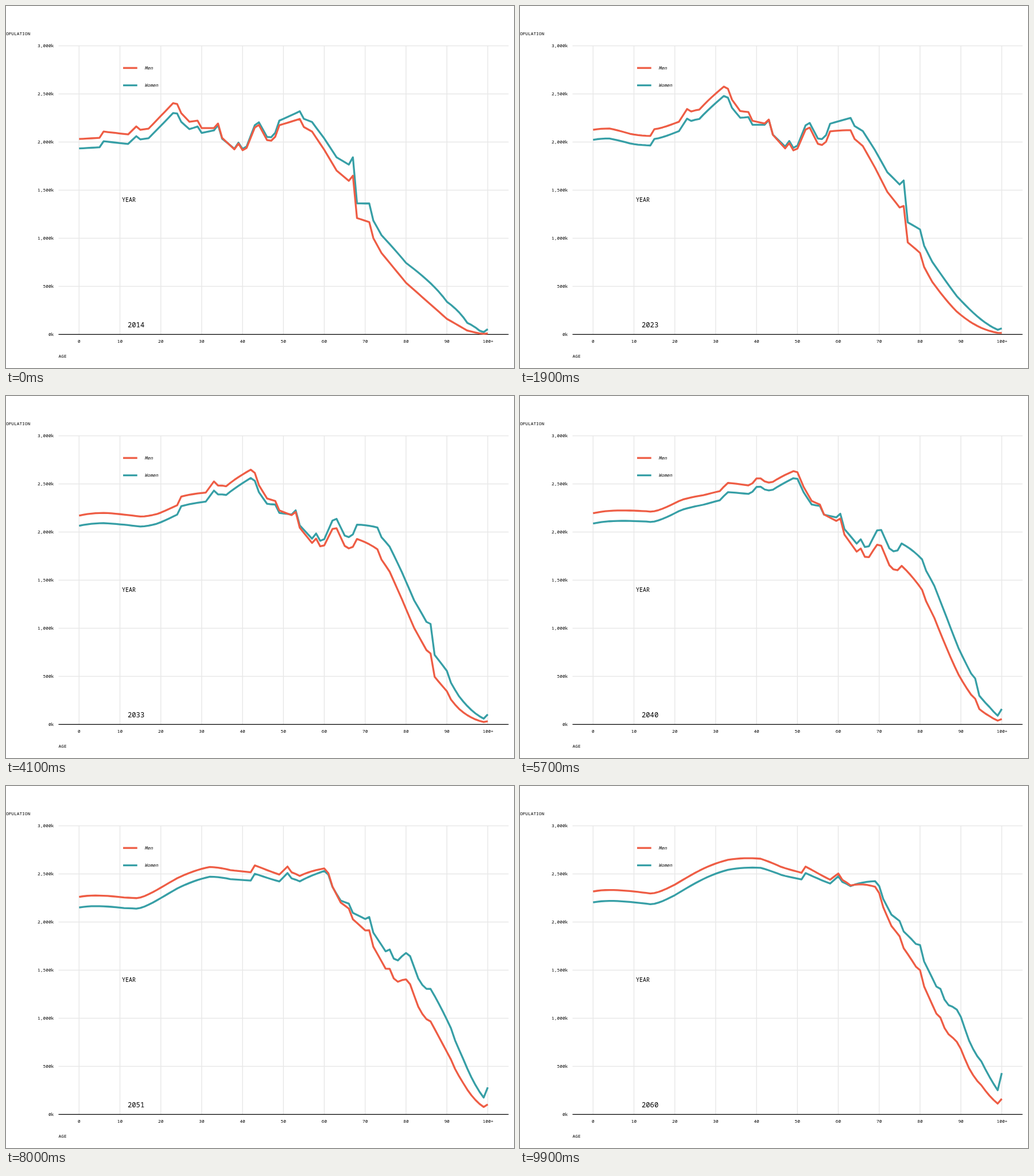
An HTML page that plays this animation: 885x632 px, repeating every 10000 ms.

```html
<!DOCTYPE html>
<html lang="en">
<head>
<meta charset="utf-8">
<title>Population by age</title>
<style>
  html, body { margin: 0; width: 100%; height: 100%; overflow: hidden; background: #fff; }
  svg { display: block; width: 885px; height: 632px; }
  text { font: 500 7.83px "Roboto Mono", "Noto Sans Mono", "DejaVu Sans Mono", monospace; }
  .grid { stroke: #e8e8e8; stroke-width: 1.5; }
  .curve { fill: none; stroke-width: 3.3; stroke-linejoin: round; }
</style>
</head>
<body>
<svg id="chart" viewBox="0 0 885 632"></svg>
<script>
const chart = document.getElementById("chart");
const ZERO = 573.2, STEPS = 100, YEARS = 46;
const { exp, max, round } = Math;
const px = age => 127.3 + 7.12 * age;

function add(tag, attrs, text = "") {
  const el = document.createElementNS("http://www.w3.org/2000/svg", tag);
  for (const key in attrs) el.setAttribute(key, attrs[key]);
  el.textContent = text;
  return chart.appendChild(el);
}
const line = (x1, y1, x2, y2, attrs) => add("line", { x1, y1, x2, y2, ...attrs });
const label = (x, y, text, attrs) => add("text", { x, y, ...attrs }, text);

function interp(points, x) {
  let i = 0;
  while (i < points.length - 2 && x > points[i + 1][0]) i++;
  const [[x0, y0], [x1, y1]] = points.slice(i, i + 2);
  return y0 + (y1 - y0) * (x - x0) / (x1 - x0);
}
const sigmoid = x => 1 / (1 + exp(-x));

// Male cohorts by age in the first year (negative: born later), heights in pixels.
const cohorts = [
  [-46, 389], [-26, 368], [-13, 361], [-5, 353], [0, 341], [5, 343], [6, 354], [12, 349],
  [14, 363], [15, 357], [17, 359], [23, 403.5], [24, 402], [25, 386], [27, 371], [29, 373],
  [30, 360], [33, 360], [34, 368], [35, 343], [38, 323], [39, 333], [40, 321.5], [41, 325.5],
  [43, 361], [44, 365.5], [46, 339], [47, 338], [48, 345], [49, 365], [54, 376], [55, 362],
  [57, 354], [60, 322], [63, 286], [66, 268], [67, 277], [68, 203], [71, 196], [72, 168],
  [74, 142], [80, 90], [90, 27], [95, 6.5], [98, 1.5], [100, 0.1]
];

// Log share of women to men, rising with age.
const womenShare = c => -0.05 + 0.046 * sigmoid((c - 30.5) / 3) + 0.69 * exp(0.082 * (c - 89));

const men = {
  name: "Men", color: "#ee5d45", y: 108.2,
  start: c => interp(cohorts, c),
  migration: 0.195, mortality: 0.199, aging: 0.104, progress: 0.0075,
  oldest: k => 1.6 + 25.5 * (k / YEARS) ** 2.2
};
const women = {
  name: "Women", color: "#379fa6", y: 138.5,
  start: c => interp(cohorts, c) * exp(womenShare(c)),
  migration: 0.205, mortality: 0.119, aging: 0.115, progress: 0.01,
  oldest: k => 9 + 63 * (k / YEARS) ** 2.3
};

// Each cohort gains by migration and shrinks by Gompertz mortality that eases over time.
function height(sex, age, k) {
  if (age === 100) return sex.oldest(k);
  const c = age - k;
  const share = sex.migration + 0.03 * sigmoid((8 - c) / 2.5);
  const gain = a => 0.032 * (1 - exp(-a / 5)) + share * (1 - exp(-((max(0, a - 14) / 14) ** 1.5)));
  const loss = (a, t) => sex.mortality * exp(sex.aging * (a - 69.5) - sex.progress * t);
  const logSize = (a, t) => gain(a) - loss(a, t);
  return sex.start(c) * exp(logSize(age, k) - logSize(max(c, 0), max(-c, 0)));
}

// Static parts
for (let i = 0; i <= 10; i++) {
  line(px(i * 10), 69, px(i * 10), ZERO, { class: "grid" });
  label(px(i * 10) + (i === 10 ? 0.6 : 0), 588, i === 10 ? "100+" : i * 10, { "text-anchor": "middle" });
}
for (let i = 0; i <= 6; i++) {
  const y = 573.4 - i * 84;
  if (i) line(91.5, y, 875.5, y, { class: "grid" });
  label(83.3, y + 2.7, (i * 500).toLocaleString("en-US") + "k", { "text-anchor": "end" });
}
label(42.2, 51.3, "POPULATION", { "text-anchor": "end" });
label(91.5, 614.2, "AGE");
label(202, 341.9, "YEAR", { style: "font-size:10px" });
const yearText = label(212, 561.2, "", { style: "font-size:12.2px" });
line(91.5, 573.4, 875.5, 573.4, { stroke: "#000", "stroke-width": 1.4 });

const series = [women, men];
for (const s of series) {
  line(204, s.y, 228.7, s.y, { stroke: s.color, "stroke-width": 3.3 });
  label(241.5, s.y + 2.8, s.name, { style: "font-style:italic" });
  s.path = add("path", { class: "curve", stroke: s.color });
}

const stepOf = year => round(year * (STEPS - 1) / YEARS);

function draw(step) {
  let year = 0;
  while (year < YEARS - 1 && stepOf(year + 1) <= step) year++;
  const part = (step - stepOf(year)) / (stepOf(year + 1) - stepOf(year));

  // Between two years the older half of the curve slides sideways.
  const ages = [];
  for (let a = 0; a <= 100; a++) ages.push(a > 50 && a < 95 ? a + part % 1 : a);

  for (const s of series) {
    const points = ages.map(a => `${px(a).toFixed(2)},${(ZERO - height(s, a, year + part)).toFixed(2)}`);
    s.path.setAttribute("d", "M" + points.join("L"));
  }
  yearText.textContent = round(2014 + YEARS * step / (STEPS - 1));
}

let last = -1;
function tick() {
  const step = Math.floor(performance.now() / 100) % STEPS;
  if (step !== last) draw(last = step);
  requestAnimationFrame(tick);
}
tick();
</script>
</body>
</html>
```
